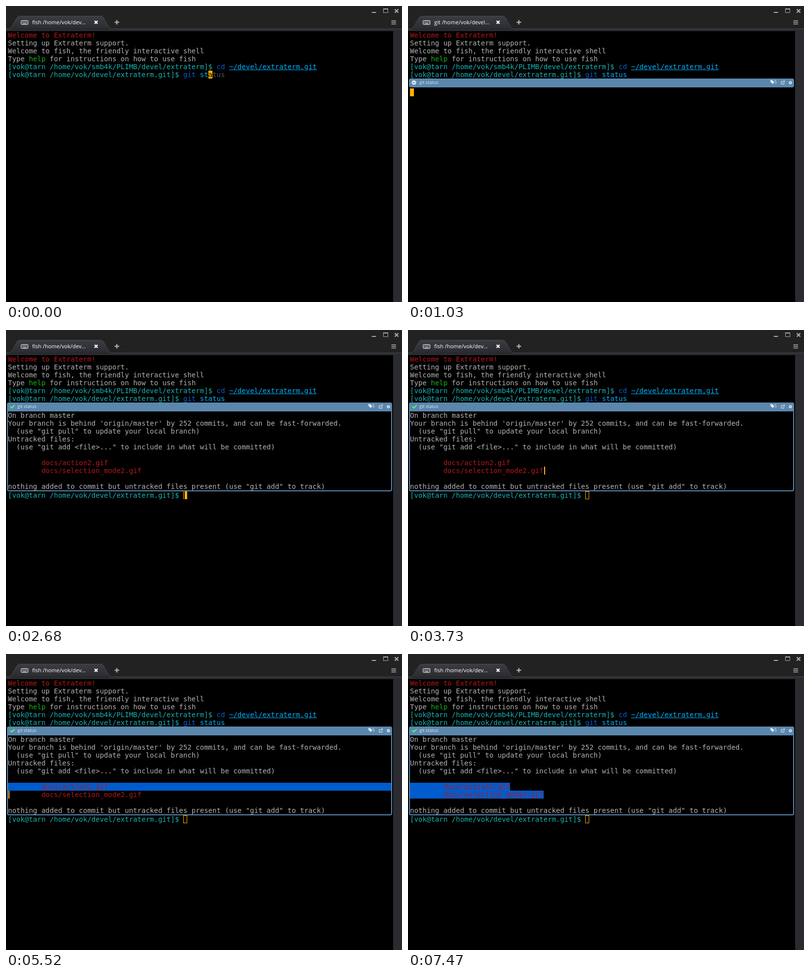
Write an HTML page that moves like this. It is 800 px wide and 600 px high and loops after 8 s.

```html
<!DOCTYPE html>
<html lang="en">
<head>
<meta charset="utf-8">
<title>Terminal selection mode</title>
<style>
  :root {
    --amber: #ffb000;
    --cyan: #00afff;
    --blue: #005fd7;
    --hint: #555;
    --frame: #5b87ad;
    --chrome: #2a2b30;
  }
  html, body { margin: 0; width: 100%; height: 100%; overflow: hidden; background: #000; }
  .stage { position: relative; width: 800px; height: 600px; overflow: hidden; background: #000; }
  .stage > * { position: absolute; }
  svg { left: 0; top: 0; }
  pre, .cell { margin: 0; font: 14px/16px "DejaVu Sans Mono", monospace; }
  pre { left: 4px; color: #b2b2b2; white-space: pre; }
  .ui { font: 11px/15px "Open Sans", sans-serif; color: #fff; white-space: nowrap; }
  .small { font-size: 9px; line-height: 13px; color: #dce7f0; }
  .red { color: #b21818; }
  .green { color: #18b218; }
  .prompt { color: #18b2b2; }
  .cmd { color: var(--blue); }
  .arg { color: var(--cyan); }
  .scroll { left: 782px; top: 47px; width: 18px; height: 553px; background: var(--chrome); }

  /* every timeline is one 8 s loop of hard steps */
  .anim, .anim * { animation: 8s step-end infinite; }

  .k1 { animation-name: k1 !important; }
  .k2 { animation-name: k2 !important; }
  .k3 { animation-name: k3 !important; }
  .k4 { animation-name: k4 !important; }
  @keyframes k1 { 0% { color: #000 } 1.75%, 100% { color: var(--cyan) } }
  @keyframes k2 { 0% { color: var(--hint) } 1.75% { color: #000 } 5.5%, 100% { color: var(--cyan) } }
  @keyframes k3 { 0% { color: var(--hint) } 5.5% { color: #000 } 9.125%, 100% { color: var(--cyan) } }
  @keyframes k4 { 0% { color: var(--hint) } 9.125%, 100% { color: var(--cyan) } }

  .cursor { width: 1ch; height: 16px; animation-name: move, hollow; }
  @keyframes move {
    0% { left: calc(4px + 48ch); top: 131px }
    1.75% { left: calc(4px + 49ch); top: 131px }
    5.5% { left: calc(4px + 50ch); top: 131px }
    9.125% { left: calc(4px + 52ch); top: 131px }
    12.875% { left: 4px; top: 167px }
    14.75%, 100% { left: calc(4px + 42ch); top: 327px }
  }
  @keyframes hollow {
    0% { background: var(--amber); box-shadow: none }
    33.5% {
      background: linear-gradient(90deg, var(--amber) 1px, #000 1px 3px, var(--amber) 3px);
      box-shadow: none;
    }
    37.25%, 100% { background: none; box-shadow: inset 0 0 0 1px var(--amber) }
  }

  .run { animation-name: run; }
  .idle { animation-name: idle; }
  .head { animation-name: head; }
  .done { animation-name: done; }
  @keyframes run { 0% { visibility: hidden } 12.875% { visibility: visible } 14.75%, 100% { visibility: hidden } }
  @keyframes idle { 0% { visibility: visible } 12.875% { visibility: hidden } 14.75%, 100% { visibility: visible } }
  @keyframes head { 0% { visibility: hidden } 12.875%, 100% { visibility: visible } }
  @keyframes done { 0% { visibility: hidden } 14.75%, 100% { visibility: visible } }

  .bar { left: 2px; top: 147px; width: 778px; height: 18px; border-radius: 4px; background: var(--frame); }
  .border {
    left: 2px; top: 147px; width: 774px; height: 176px;
    border: 2px solid var(--frame); border-radius: 4px; animation-name: border;
  }
  @keyframes border {
    0% { opacity: 0 } 14.75% { opacity: .3 } 16.625% { opacity: .65 }
    18.5% { opacity: .96 } 20.375%, 100% { opacity: 1 }
  }

  .sel { left: 4px; height: 16px; background: #005ccc; }
  .sel1 { top: 261px; animation-name: sel1; }
  .sel2 { top: 277px; animation-name: sel2; }
  @keyframes sel1 { 0% { width: 0 } 69% { width: 774px } 87.75%, 100% { width: 24ch } }
  @keyframes sel2 { 0% { width: 0 } 72.75%, 100% { width: 32ch } }

  .caret { width: 2px; height: 16px; background: #ffb52b; }
  .main { animation-name: caret; }
  .twin { left: 207px; top: 261px; animation-name: twin; }
  @keyframes caret {
    0% { left: 359px; top: 309px; opacity: 0 }
    37.25% { left: 359px; top: 309px; opacity: 1 }
    39.125% { left: 5px; top: 293px; opacity: 1 }
    46.625% { left: 275px; top: 277px; opacity: 1 }
    50.375% { left: 207px; top: 261px; opacity: 1 }
    55.875% { left: 5px; top: 277px; opacity: 1 }
    57.75% { left: 5px; top: 261px; opacity: 1 }
    63.375% { left: 5px; top: 261px; opacity: 0 }
    69% { left: 5px; top: 277px; opacity: 1 }
    72.75% { left: 275px; top: 277px; opacity: 1 }
    80.25% { left: 275px; top: 277px; opacity: 0 }
    85.875% { left: 275px; top: 277px; opacity: 1 }
    93.375%, 100% { left: 275px; top: 277px; opacity: 0 }
  }
  @keyframes twin { 0% { opacity: 0 } 87.75% { opacity: 1 } 93.375%, 100% { opacity: 0 } }
</style>
</head>
<body>
<div class="stage anim">
  <div class="scroll"></div>
  <svg width="800" height="51" fill="none">
    <defs>
      <linearGradient id="tab" x1="0" y1="20" x2="0" y2="47" gradientUnits="userSpaceOnUse">
        <stop stop-color="#3b3d42"/><stop offset="1" stop-color="#2a2b30"/>
      </linearGradient>
    </defs>
    <path fill="#222" d="M0 0H800V47H0z"/>
    <path fill="#2a2b30" d="M0 47H800V51H0z"/>
    <path fill="url(#tab)" stroke="#4a4b4f" d="M-1 46.5H6Q10 46 12 42L22 24Q24 20.5 28 20.5H191Q195 20.5 197 24L207 42Q209 46 213 46.5H801"/>
    <g stroke="#fff">
      <rect x="30.5" y="29.5" width="14" height="8" rx="1"/>
      <path stroke-dasharray="1 1" d="M32 31.5H43M33 33.5H43"/>
      <path d="M32 35.5H33M34 35.5H41M42 35.5H43"/>
      <path stroke-width="2.4" d="M179 30L185 36M185 30L179 36"/>
    </g>
    <g stroke="#aaa">
      <path stroke-width="2.4" d="M219.5 33H228.500M224 28.500V37.500M785.500 6.500L792.500 13.500M792.500 6.500L785.500 13.500"/>
      <path stroke-width="2" d="M739 13H747.500M762 6H772"/>
      <path d="M762.500 6V13.500H771.500V6"/>
      <path stroke-width="1.500" d="M778.500 30H788M778.500 33.200H788M778.500 36.500H788"/>
    </g>
  </svg>
  <div class="ui idle" style="left:53px;top:25px">fish /home/vok/dev…</div>
  <div class="ui run" style="left:53px;top:25px">git /home/vok/devel…</div>

  <div class="cell cursor"></div>
  <pre style="top:51px"><span class="red">Welcome to Extraterm!</span>
Setting up Extraterm support.
Welcome to fish, the friendly interactive shell
Type <span class="green">help</span> for instructions on how to use fish
<span class="prompt">[vok@tarn /home/vok/smb4k/PLIMB/devel/extraterm]$</span> <span class="cmd">cd</span> <u class="arg">~/devel/extraterm.git</u>
<span class="prompt">[vok@tarn /home/vok/devel/extraterm.git]$</span> <span class="cmd">git</span> <span class="arg">st<span class="k1">a</span><span class="k2">t</span><span class="k3">u</span><span class="k4">s</span></span></pre>

  <div class="border"></div>
  <div class="bar head"></div>
  <div class="ui small head" style="left:23px;top:148px">git status</div>
  <div class="ui small head" style="left:740px;top:147px">5</div>
  <svg class="head" width="800" height="170" fill="none" stroke="#e6eef5">
    <path fill="#e6eef5" stroke="none" fill-rule="evenodd" d="M732 150H735.500L740 154.500L736.800 158L732 153.500zM733.200 151.200V152.500H734.500V151.200z"/>
    <path d="M757 153H754V158.500H759.500V156M756.500 156L760.500 152M758 151.800H760.700V154.500"/>
    <circle cx="772.500" cy="155.500" r="2" stroke-width="1.500"/>
    <circle cx="772.500" cy="155.500" r="3" stroke-dasharray="1.180"/>
  </svg>
  <svg class="run" width="30" height="170" fill="none" stroke="#e6eef5">
    <circle cx="12" cy="155.200" r="2.600" stroke-width="2.200"/>
    <circle cx="12" cy="155.200" r="4.200" stroke-width="1.600" stroke-dasharray="1.650"/>
  </svg>
  <svg class="done" width="30" height="170" fill="none" stroke="#55ff55" stroke-width="2.200">
    <path d="M8.800 155L11.800 158L17.300 152.300"/>
  </svg>

  <div class="cell sel sel1"></div>
  <div class="cell sel sel2"></div>
  <pre class="done" style="top:165px">On branch master
Your branch is behind 'origin/master' by 252 commits, and can be fast-forwarded.
  (use "git pull" to update your local branch)
Untracked files:
  (use "git add &lt;file&gt;..." to include in what will be committed)

<span class="red">        docs/action2.gif
        docs/selection_mode2.gif</span>

nothing added to commit but untracked files present (use "git add" to track)</pre>
  <pre class="done prompt" style="top:327px">[vok@tarn /home/vok/devel/extraterm.git]$</pre>
  <div class="caret main"></div>
  <div class="caret twin"></div>
</div>
</body>
</html>
```
